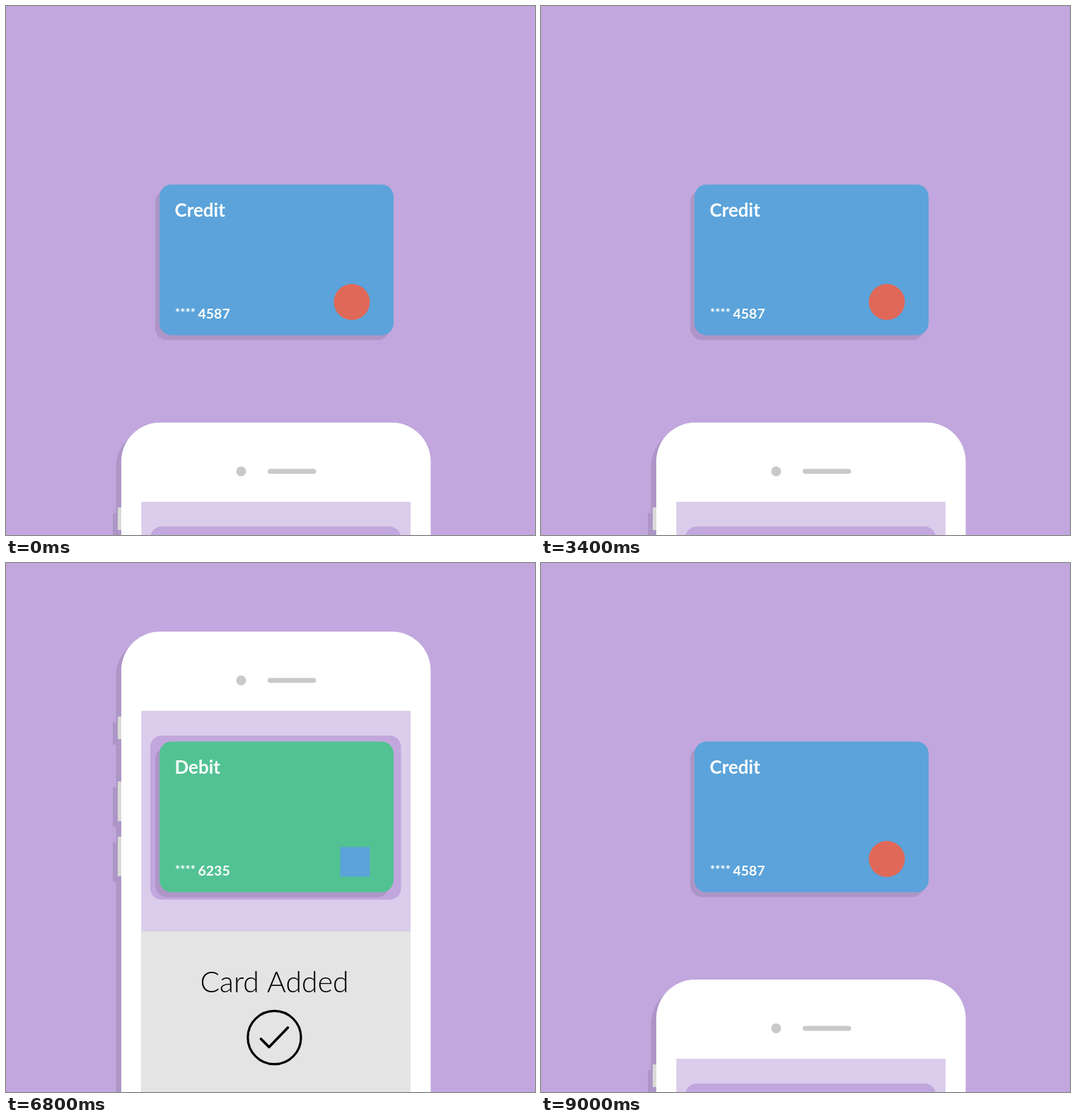
These frames come from a looping animation (748x748 px, 9.3 s). An HTML page with a canvas:

```html
<!DOCTYPE html>
<html lang="en">
<head>
<meta charset="utf-8">
<title>Add a card</title>
<style>
  html, body { margin: 0; width: 100%; height: 100%; overflow: hidden; background: #c1a7dd; }
  canvas { display: block; }
</style>
</head>
<body>
<canvas id="stage" width="748" height="748"></canvas>
<script>
const SIZE = 748, LOOP = 9300, STEP = 100;
const REST = 589, UP = 97, PEAK = 71;
const SHADOW = 'rgba(0,0,0,.1)';
const FONT = 'Lato, "Open Sans", sans-serif';
const ctx = document.getElementById('stage').getContext('2d');

// Start times of the two passes: phone up, card confirmed, phone down, cards swapped
const passes = [
  { rise: 75, confirm: 1750, fall: 2717, swap: 3840 },
  { rise: 4645, confirm: 6050, fall: 7417, swap: 8240 }
];

const clamp = x => Math.min(1, Math.max(0, x));
const linear = x => x;
const sine = x => (1 - Math.cos(Math.PI * x)) / 2;
const cubic = x => x < .5 ? 4 * x ** 3 : 1 - 4 * (1 - x) ** 3;
const cubicOut = x => 1 - (1 - x) ** 3;
const ramp = (t, start, length, ease = linear) => ease(clamp((t - start) / length));

function phoneTop(t) {
  return passes.reduce((y, p) => y
    - (REST - PEAK) * ramp(t, p.rise, 625, sine)
    + (UP - PEAK) * ramp(t, p.rise + 625, 120, sine)
    + (REST - UP) * ramp(t, p.fall, 670, cubic), REST);
}

function box(x, y, w, h, r, color) {
  ctx.fillStyle = color;
  ctx.beginPath();
  ctx.roundRect(x, y, w, h, r);
  ctx.fill();
}

function disc(x, y, r, color) {
  ctx.fillStyle = color;
  ctx.beginPath();
  ctx.arc(x, y, r, 0, Math.PI * 2);
  ctx.fill();
}

function label(text, x, y, size, weight, color, align = 'left') {
  ctx.font = `${weight} ${size}px ${FONT}`;
  ctx.textAlign = align;
  ctx.fillStyle = color;
  ctx.fillText(text, x, y);
}

function drawCard(shift, card) {
  if (Math.abs(shift) >= SIZE) return;
  ctx.save();
  ctx.translate(shift, 0);
  box(211, 260, 331, 212.5, 17, SHADOW);
  box(217, 252.5, 331, 213, 17, card.color);
  label(card.title, 238.5, 298, 26, 700, '#fff');
  label('****', 239, 440, 17, 700, '#fff');
  label(card.digits, 271.5, 441.5, 19.5, 700, '#fff');
  card.badge();
  ctx.restore();
}

const credit = {
  title: 'Credit', digits: '4587', color: '#5ba3da',
  badge: () => disc(489, 418.5, 25.5, '#e06858')
};
const debit = {
  title: 'Debit', digits: '6235', color: '#52c292',
  badge: () => box(472.5, 401.5, 42, 42, 0, '#5ba3da')
};

function drawCards(t) {
  const [first, second] = passes.map(p => ramp(t, p.swap, 740, cubic));
  drawCard(second > 0 ? SIZE * (1 - second) : -SIZE * first, credit);
  drawCard(second > 0 ? -SIZE * second : SIZE * (1 - first), debit);
}

function drawMessage(t) {
  const pass = t < passes[1].rise ? passes[0] : passes[1];
  const p = ramp(t, pass.confirm, 740);
  ctx.globalAlpha = 1 - ramp(p, 0, .35);
  label('Add Card', 386.5, 510, 41, 300, '#000', 'center');
  ctx.globalAlpha = ramp(p, .3, .35);
  label('Card Added', 379.5, 510, 41, 300, '#000', 'center');

  const shown = ramp(p, .4, .6, cubicOut);
  ctx.globalAlpha = shown;
  ctx.save();
  ctx.translate(379.5, 574 + 24 * (1 - shown));
  ctx.strokeStyle = '#000';
  ctx.lineCap = ctx.lineJoin = 'round';
  ctx.lineWidth = 3.2;
  ctx.beginPath();
  ctx.arc(0, 0, 37.6, 0, Math.PI * 2);
  ctx.stroke();
  ctx.lineWidth = 3.6;
  ctx.beginPath();
  ctx.moveTo(-19, 2);
  ctx.lineTo(-7.5, 13.5);
  ctx.lineTo(19, -14);
  ctx.stroke();
  ctx.restore();
  ctx.globalAlpha = 1;
}

function drawPhone(t) {
  const buttons = [[120, 32], [212, 56], [290, 56]];
  const body = new Path2D();
  body.roundRect(163, 0, 437.5, 900, 55);

  ctx.save();
  ctx.translate(0, phoneTop(t));

  // The shadow falls only outside the body, as the screen is see-through
  ctx.save();
  const outside = new Path2D(body);
  outside.rect(-SIZE, -SIZE, 3 * SIZE, 3 * SIZE);
  ctx.clip(outside, 'evenodd');
  ctx.fillStyle = SHADOW;
  ctx.beginPath();
  ctx.roundRect(155.5, 8, 437.5, 900, 55);
  for (const [y, h] of buttons) ctx.roundRect(151, y + 8, 12, h, 1);
  ctx.fill();
  ctx.restore();
  for (const [y, h] of buttons) box(158, y, 5.5, h, 1, '#dadad6');

  const front = new Path2D(body);
  front.rect(191.5, 112, 380.5, 700);
  ctx.fillStyle = '#fff';
  ctx.fill(front, 'evenodd');
  disc(332.5, 69, 7, '#c9c9c9');
  box(370, 65.5, 68.5, 7, 3.5, '#c9c9c9');

  const veil = new Path2D();
  veil.rect(191.5, 112, 380.5, 311.5);
  veil.roundRect(204, 147, 354.5, 232, 16);
  ctx.fillStyle = 'rgba(255,255,255,.41)';
  ctx.fill(veil, 'evenodd');
  box(191.5, 423.5, 380.5, 400, 0, '#e4e4e4');
  drawMessage(t);
  ctx.restore();
}

const origin = performance.now();

function frame() {
  // The motion runs at ten pictures a second
  const now = (performance.now() - origin) % LOOP;
  const t = Math.floor(now / STEP) * STEP;
  ctx.fillStyle = '#c1a7dd';
  ctx.fillRect(0, 0, SIZE, SIZE);
  drawCards(t);
  drawPhone(t);
  requestAnimationFrame(frame);
}
frame();
</script>
</body>
</html>
```
